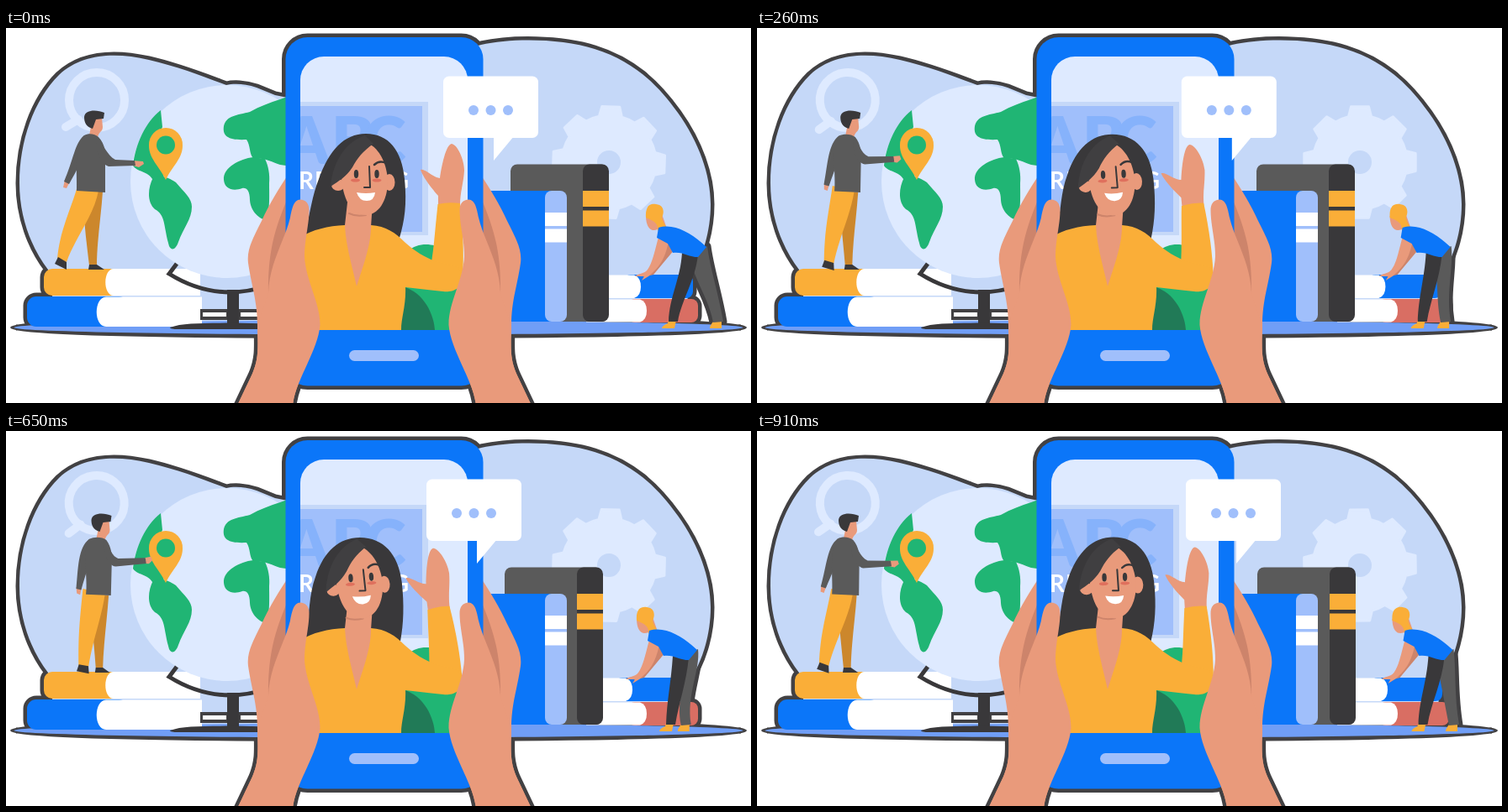
An HTML page for the animation above (1.04 s loop, 886 by 447 pixels).

```html
<!DOCTYPE html>
<html lang="en">
<head>
<meta charset="utf-8">
<title>Online learning</title>
<style>
html, body { margin: 0; width: 100%; height: 100%; overflow: hidden; background: #fff; }
svg { display: block; width: 886px; height: 447px; }
text { font-family: Lato, sans-serif; font-weight: 700; }
</style>
</head>
<body>
<svg id="stage" viewBox="0 0 886 447"></svg>
<script>
const C = {
  line: '#424143', sky: '#c5d8f8', pale: '#deeaff', blue: '#0b76f9', soft: '#a0bffb', letter: '#86b2fb',
  ground: '#709ef6', green: '#20b574', pine: '#217a57', yellow: '#faae38', amber: '#cc872c',
  skin: '#e99a7b', shade: '#cd846b', blush: '#df705d', dark: '#39383a', lock: '#403f41', gray: '#5a5a5a', red: '#d96e63', white: '#fff'
};

// Progress of each part over the five poses; the loop runs through them and back.
const EASE = {
  slide: [0, .25, .38, .5, 1],
  body: [0, .4, .62, .85, 1],
  step: [0, .33, .48, .65, 1],
  head: [0, .3, .42, .55, 1],
  wave: [0, .2, .33, .47, 1],
  book: [0, .5, .6, .7, 1],
  lens: [0, .17, .23, .3, 1],
  gear: [2, -1, 0, 1.5, 8]
};

const NUM = /-?\d+(\.\d+)?/g;
const mix = (a, b, p) => {
  const ends = b.match(NUM);
  let i = 0;
  return a.replace(NUM, v => (+v + (ends[i++] - v) * p).toFixed(2));
};
const path = (fill, d) => `<path fill="${fill}" d="${d}"/>`;
const line = (color, width, d) => `<path d="${d}" fill="none" stroke="${color}" stroke-width="${width}" stroke-linecap="round" stroke-linejoin="round"/>`;
const rect = (fill, x, y, w, h, r = 0) => `<rect fill="${fill}" x="${x}" y="${y}" width="${w}" height="${h}" rx="${r}"/>`;
const oval = (fill, x, y, rx, ry = rx) => `<ellipse fill="${fill}" cx="${x}" cy="${y}" rx="${rx}" ry="${ry}"/>`;
const group = (transform, ...parts) => `<g transform="${transform}">${parts.join('')}</g>`;
const mirror = s => group('translate(900 0) scale(-1 1)', s);

const BLOB = 'M60 350L50 288C30 262 16 225 16 185C16 135 33 86 63 56C91 30 130 29 170 38C205 46 235 58 262 68C270 66 284 66 298 71L320 80L335 83L565 20C600 12 660 12 700 25C745 39 774 66 799 101C824 136 838 175 838 210C838 245 827 278 811 300L810 350Z';
const ARM = 'M340 168C325 190 312 212 304 230C294 250 286 264 288 280C292 308 299 325 299 355C300 385 300 395 293 412L275 450H341C344 420 370 385 373 354C375 325 356 300 355 270L340 230Z';
const THUMB = 'M350.500 204.500C342 204 340 216 338 226C332 252 313 280 312 316L299 355C300 385 300 395 293 412L275 450H341C344 420 371 385 373.500 354C374 328 356 300 355 272C355 252 360.500 235 360.500 217C360.500 210 357 205 350.500 204.500Z';
const CREASE = 'M334 205C322 235 311 262 312 316C316 295 328 275 334 245Z';
const GROUND = oval(C.ground, 443, 357, 433.5, 8.5);
const PHONE = rect(C.blue, 332.5, 11, 235, 415.5, 26);

function gear(angle) {
  const at = (r, deg) => {
    const a = deg * Math.PI / 180;
    return `${(r * Math.cos(a)).toFixed(1)} ${(r * Math.sin(a)).toFixed(1)}`;
  };
  const teeth = Array.from({ length: 8 }, (_, i) => {
    const a = i * 45 - 90;
    return `${at(56, a - 14)}L${at(67, a - 9)}L${at(67, a + 9)}L${at(56, a + 14)}A56 56 0 0 1 `;
  });
  return group(`translate(717 160) rotate(${angle})`,
    `<path fill="${C.pale}" stroke="${C.pale}" stroke-width="3" stroke-linejoin="round" d="M${teeth.join('')}${at(56, -104)}Z"/>`,
    oval(C.sky, 0, 0, 14));
}

const lens = p => group(`translate(${108 - p} 86) rotate(${-22 * p})`,
  `<circle r="33" fill="none" stroke="${C.pale}" stroke-width="10"/>`,
  line(C.pale, 10, 'M-22 23L-37 32'));

const leftBooks = () =>
  rect(C.yellow, 45, 287, 110, 32, 10) + path(C.white, 'M231 287H128C115 287 115 319 128 319H231Z') +
  rect(C.blue, 25, 320, 120, 36, 11) + path(C.white, 'M233 320.500H119C104 321 104 356 119 356H233Z');

const globe = () =>
  oval(C.pale, 263, 183, 115) +
  path(C.green, 'M184 98C166 112 154 138 151 164C156 172 168 170 174 180L188 178C186 168 180 160 182 150C188 140 180 128 186 118Z') +
  path(C.green, 'M175 178C168 192 168 208 177 216C190 223 187 235 194 260C197 266 202 264 205 255C211 238 221 228 221 213C221 203 212 196 202 184C194 179 188 176 175 178Z') +
  path(C.green, 'M340 80L326 85C314 89 302 93 290 100C275 104 262 104 259 117C257 130 266 134 286 133C291 140 289 150 294 155C305 154 318 160 326 163L340 165Z') +
  path(C.green, 'M294 154C278 156 258 166 259 181C260 192 270 195 281 191C286 190 290 194 290 205C291 220 302 227 310 230C314 214 313 200 313 185C314 175 312 164 308 156Z') +
  path(C.yellow, 'M190 119A20 20 0 0 0 170 140C170 156 182 164 190 181C198 164 210 156 210 140A20 20 0 0 0 190 119Z') +
  oval(C.green, 190, 139.5, 11) +
  rect(C.line, 231, 335, 70, 13) + rect(C.white, 234, 339, 28, 5) + rect(C.white, 279, 339, 20, 5) +
  `<path d="M203 281L194 293Q250 328 312 307" fill="none" stroke="${C.dark}" stroke-width="5"/>` +
  rect(C.dark, 263, 312, 14, 44) + path(C.dark, 'M195 357C210 351 235 352 270 351.500L335 353V359H205Q195 359 195 357Z');

function explorer(p, q) {
  const part = (fill, t, a, b) => path(fill, mix(a, b, t));
  return part(C.amber, q, 'M92 194L115 195C113 225 108 255 108 283L99 283C95 250 92 225 92 194Z', 'M104 195L126 196C124 225 120 255 119 283L111 283C110 255 106 225 104 195Z') +
    part(C.yellow, q, 'M85 188L110 194C104 225 82 250 72 279L61 275C64 240 78 215 85 188Z', 'M95 188L122 194C118 225 114 250 112 283L100 283C97 245 94 220 95 188Z') +
    part(C.dark, q, 'M62 273L72 279L72 288L58 281Z', 'M100 281L112 281L113 290L98 289Z') +
    part(C.dark, q, 'M99 282L108 282L117 288L98 288Z', 'M111 282L119 282L127 288L110 288Z') +
    part(C.skin, p, 'M70 181L76 183L72 191L68 190Z', 'M86 187L92 188L91 196L87 194Z') +
    part(C.skin, p, 'M151 158L163 159L164 162L158 166L151 164Z', 'M167 150L174 148L176 153L172 157L167 157Z') +
    group(`translate(${10 * p} 0)`,
      path(C.skin, 'M103 108L114 107L115 118C115 124 110 123 109 131L99 128Z'),
      path(C.dark, 'M93 106C94 97 108 97 117 101L116 108L107 109L103 120C95 118 93 112 93 106Z')) +
    part(C.gray, p, 'M93 128C82 136 80 158 69 183L75 186C84 170 92 155 97 140Z', 'M100 129C86 140 87 165 86 189L92 190C96 172 102 155 105 142Z') +
    part(C.gray, p, 'M93 128C98 125 106 126 110 130C118 138 119 150 118 162L118 196L84 194C85 175 80 140 93 128Z', 'M100 129C106 126 116 126 121 130C127 138 128 150 127 162L126 196L97 195C100 178 92 142 100 129Z') +
    part(C.gray, p, 'M108 130C116 138 120 152 130 157L153 158L154 164L122 165C110 160 106 145 108 130Z', 'M118 130C126 136 124 147 134 151L168 150L169 157L132 161C122 160 118 145 118 130Z');
}

const stack = p =>
  rect(C.blue, 735 - 20 * p, 294, 82 + 12 * p, 28, 8) +
  path(C.white, `M690 294.500H${747 - 20 * p}q8 3 8 14q0 11 -8 13.500H690Z`) +
  rect(C.red, 740, 323, 83, 28, 8) + path(C.white, 'M690 323.500H754Q762 326 762 337Q762 348 754 350.500H690Z');

const tallBooks = p =>
  group(`translate(${-10 * p} 0)`,
    rect(C.gray, 600, 162.5, 116, 187.5, 8), rect(C.dark, 686, 162.5, 31, 187.5, 8),
    rect(C.yellow, 686, 194, 31, 19), rect(C.yellow, 686, 217.5, 31, 19)) +
  rect(C.blue, 540, 194, 125, 156, 8) + rect(C.soft, 641, 194, 26, 156, 8) +
  rect(C.white, 641, 220, 26, 16) + rect(C.white, 641, 239.5, 26, 16);

const backLeg = (h, f) => `M${812 + h} 270L${834 + h} 260C${837 + h} 285 ${847 + f} 315 ${853 + f} 350L${841 + f} 351C${835 + f} 320 ${820 + h} 305 ${812 + h} 270Z`;

function worker(h, f, g) {
  return path(C.yellow, `M${841 + f} 350L${851 + f} 350L${851 + f} 358L${837 + f} 358Q${837 + f} 355 ${841 + f} 350Z`) +
    path(C.gray, backLeg(h, f)) +
    path(C.yellow, `M${788 + g} 348H${797 + g}L${795 + g} 358H${780 + g}Q${780 + g} 355 ${787 + g} 352Z`) +
    path(C.dark, `M${804 + h} 268L${823 + h} 270C${820 + h} 300 ${803 + g} 325 ${799 + g} 350L${788 + g} 350C${789 + g} 320 ${802 + h} 300 ${804 + h} 268Z`) +
    group(`translate(${h} 0)`,
      path(C.shade, 'M788 250L795 264L770 294L758 297L775 274Z'),
      path(C.skin, 'M761 224L780 222L787 242L778 246L775 240C766 244 761 236 761 224Z'),
      path(C.skin, 'M777 246L788 255C784 272 780 283 764 296L756 301L759 296L748 296C752 292 758 294 763 288C770 278 772 262 777 246Z'),
      path(C.yellow, 'M761 226C760 212 766 209 773 210C783 211 783 220 780 226C782 236 789 238 789 250C783 251 775 246 775 238C774 231 768 229 761 226Z'),
      path(C.blue, 'M776 238C795 232 816 245 833 261L823 273C812 273 804 266 793 268L787 257L774 250Z'));
}

function teacher(p, wave) {
  const hair = mix('M356 242C362 220 364 200 372 180C384 146 402 126 428 126C455 126 471 146 474 180C477 210 474 230 468 250L356 250Z',
    'M357 242C361 215 357 190 365 168C374 140 392 128 415 128C444 128 463 148 468 180C471 205 472 230 470 250L357 250Z', p);
  return path(C.green, 'M478 266C488 256 506 256 516 262V310H549V360H470V310Z') +
    path(C.pine, 'M470 308C492 312 508 335 510 360H465Z') +
    path(C.dark, hair) +
    group(`translate(0 ${2 * wave}) rotate(${-16.7 * wave} 525 300)`,
      path(C.skin, 'M514 212L514 200C506 191 496 178 493 169C498 167 507 178 516 179C518 165 523 139 530 138C537 139 545 157 545 170C544 186 540 195 540 212Z'),
      path(C.yellow, 'M513.500 210Q526 207 540 209C543 235 545 265 543 300L530 312L502 300C509 270 510 240 513.500 210Z')) +
    path(C.yellow, 'M340 257C355 243 378 236 403 235H434C452 236 463 244 475 256C486 266 498 273 510 278L538 285L543 298C542 312 530 315 520 314L475 309C476 330 470 345 470 360H345Z') +
    path(C.skin, 'M406 208L403 235C404 260 412 285 417 308C424 285 434 260 434 237L436 208Z') +
    group(`translate(${-10 * p} ${p}) rotate(${-8 * wave} 427 190)`,
      oval(C.skin, 395, 187, 8, 7), oval(C.skin, 456, 184, 6.5, 10),
      line(C.shade, 2, 'M408 221Q416 225 428 223'),
      path(C.skin, 'M399 180C405 158 416 142 430 137C445 144 453 163 454 182C454 207 442 223 428 223C412 222 402 209 399 180Z'),
      path(C.lock, 'M437 138C424 147 418 155 412 166C404 178 396 182 386 189C388 165 400 137 427 128Z'),
      oval(C.blush, 415.5, 181.5, 5.5, 2), oval(C.blush, 441, 181.5, 5.5, 2),
      oval(C.dark, 416.5, 174, 2.7, 5), oval(C.dark, 441, 174, 2.7, 5),
      line(C.dark, 2, 'M432 165L433 190H426'),
      line(C.dark, 2.5, 'M438 163Q444 157 452 161'),
      path(C.white, 'M417 196Q428 198 439 196Q438 206 429 206Q420 206 417 196Z'));
}

const screen = (p, wave) => `<clipPath id="glass"><path d="M350 360V62A28 28 0 0 1 378 34H521A28 28 0 0 1 549 62V360Z"/></clipPath><g clip-path="url(#glass)">` +
  rect(C.pale, 350, 34, 199, 326) + rect(C.sky, 340, 88, 162, 159) + rect(C.soft, 340, 93, 155, 150) +
  `<text x="330 387 425" y="162" font-size="77" style="font-weight:900" fill="${C.letter}">ABC</text>` +
  `<text x="348" y="192" font-size="28" letter-spacing="1" fill="#fff">READING</text>` +
  teacher(p, wave) + '</g>';

const bubble = x => group(`translate(${x} 0)`,
  rect(C.white, 520, 57.5, 113, 73.5, 7), path(C.white, 'M580 129V158L604 129Z'),
  ...[556, 576.5, 597].map(cx => oval(C.soft, cx, 98, 6)));

function scene(k) {
  const { slide, body, step, head, wave, book, lens: turn, gear: spin } =
    Object.fromEntries(Object.entries(EASE).map(([name, poses]) => [name, poses[k]]));
  const hip = -22 * slide, heel = -45 * body, toe = -6 * slide;
  return `<g stroke="${C.line}" stroke-width="9" stroke-linejoin="round">` +
    path(C.sky, BLOB) + leftBooks() + stack(slide) + path(C.gray, backLeg(hip, heel)) +
    GROUND + PHONE + path(C.skin, ARM) + mirror(path(C.skin, ARM)) + '</g>' +
    path(C.sky, BLOB) + GROUND + lens(turn) + gear(spin) +
    leftBooks() + globe() + explorer(body, step) +
    stack(slide) + worker(hip, heel, toe) + tallBooks(book) +
    [path(C.skin, ARM) + path(C.shade, CREASE)].map(s => s + mirror(s)).join('') +
    PHONE + screen(head, wave) + rect(C.soft, 408, 384, 83, 13, 6.5) +
    path(C.skin, THUMB) + mirror(path(C.skin, THUMB)) + bubble(-40 * slide);
}

const stage = document.getElementById('stage');
let shown = -1;
function tick() {
  const k = 4 - Math.abs(4 - Math.floor(performance.now() / 130) % 8);
  if (k !== shown) stage.innerHTML = scene(shown = k);
  requestAnimationFrame(tick);
}
tick();
</script>
</body>
</html>
```
